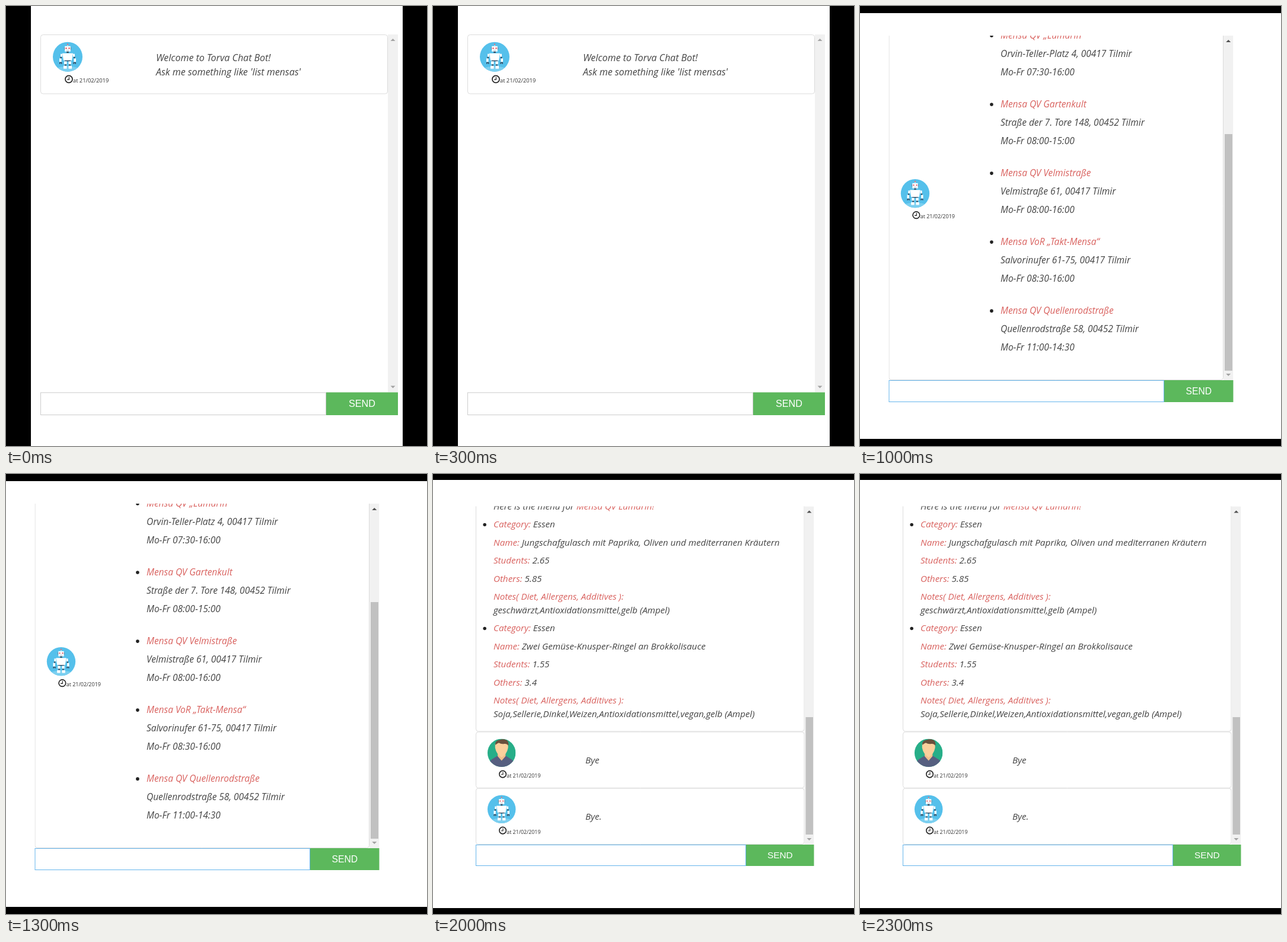
These frames come from a looping animation (710 by 742 pixels, 2.5 s). An HTML page with a canvas:

```html
<!DOCTYPE html>
<html lang="en">
<head>
<meta charset="utf-8">
<title>Chat bot demo</title>
<style>
html, body { margin: 0; width: 100%; height: 100%; overflow: hidden; background: #000; }
canvas { display: block; }
</style>
</head>
<body>
<canvas id="stage" width="710" height="742"></canvas>
<script>
const ctx = document.getElementById('stage').getContext('2d');
const STEP = 500;
const INK = '#454545', RED = '#d9625f', DIM = '#a3a3a3', DARK = '#505050';

const canteens = [
  ['Mensa QV „Lumarin“', 'Orvin-Teller-Platz 4, 00417 Tilmir', 'Mo-Fr 07:30-16:00'],
  ['Mensa QV Gartenkult', 'Straße der 7. Tore 148, 00452 Tilmir', 'Mo-Fr 08:00-15:00'],
  ['Mensa QV Velmistraße', 'Velmistraße 61, 00417 Tilmir', 'Mo-Fr 08:00-16:00'],
  ['Mensa VoR „Takt-Mensa“', 'Salvorinufer 61-75, 00417 Tilmir', 'Mo-Fr 08:30-16:00'],
  ['Mensa QV Quellenrodstraße', 'Quellenrodstraße 58, 00452 Tilmir', 'Mo-Fr 11:00-14:30'],
];

const dishes = [
  ['Jungschafgulasch mit Paprika, Oliven und mediterranen Kräutern', '2.65', '5.85',
    'geschwärzt,Antioxidationsmittel,gelb (Ampel)'],
  ['Zwei Gemüse-Knusper-Ringel an Brokkolisauce', '1.55', '3.4',
    'Soja,Sellerie,Dinkel,Weizen,Antioxidationsmittel,vegan,gelb (Ampel)'],
];

// s: zoom, page: white area, split: left edge of the button
const views = [
  { s: 1, page: [42, 0, 627, 742], left: 58, right: 644, end: 661, top: 48, bottom: 651.5,
    split: 540, foot: 690, border: '#ccc', up: DIM, down: DIM,
    draw() { welcome(48, 253); } },
  { s: 1.0075, page: [0, 9, 710, 725], left: 54.5, right: 643.5, end: 660.5, top: 29, bottom: 635,
    split: 539, foot: 673.5, thumb: [46, 461], up: DIM, down: DARK, caret: true,
    draw() {
      welcome(29, 251);
      message(130, 'user', 'list mensas', 251);
      card(231, 700);
      avatar('robot', 510);
      canteenList(251, 257);
    } },
  { s: 0.967, page: [0, 12, 710, 718], left: 48.5, right: 613, end: 629.5, top: 50, bottom: 631,
    split: 513, foot: 668, thumb: [216, 615], up: DARK, down: DIM,
    draw() {
      card(0, 631);
      avatar('robot', 292);
      canteenList(237, 49.5);
    } },
  { s: 0.95, page: [0, 11, 710, 720], left: 73.5, right: 628.5, end: 644.5, top: 57.5, bottom: 629,
    split: 529.5, foot: 665, thumb: [386, 613], up: DARK, down: DIM,
    draw() {
      message(57.5, 'user', 'show me menu for lumarin today', 258.5);
      card(152.5, 629);
      avatar('robot', 165);
      menu(103, 278.5);
    } },
  { s: 0.95, page: [0, 10, 710, 722], left: 72, right: 626.5, end: 642.5, top: 54.5, bottom: 625,
    split: 528, foot: 661, thumb: [410, 608], up: DARK, down: DIM,
    draw() {
      card(0, 434.5);
      menu(102, 85);
      message(434.5, 'user', 'Bye', 257);
      message(529.5, 'robot', 'Bye.', 257);
    } },
];
let view;

function rect(color, x, y, w, h) {
  ctx.fillStyle = color;
  ctx.fillRect(x, y, w, h);
}

function disc(color, x, y, r) {
  ctx.fillStyle = color;
  ctx.beginPath();
  ctx.arc(x, y, r, 0, 7);
  ctx.fill();
}

function shape(color, path) {
  ctx.fillStyle = color;
  ctx.fill(new Path2D(path));
}

// y is the middle of the capitals; returns the x where the text ends
function write(text, x, y, color = INK) {
  ctx.font = `italic ${16 * view.s}px "Open Sans", sans-serif`;
  ctx.fillStyle = color;
  ctx.fillText(text, x, y + 5.7 * view.s);
  return x + ctx.measureText(text).width;
}

function pair(label, value, x, y) {
  write(value, write(label + ' ', x, y, RED), y);
}

function card(top, bottom) {
  ctx.strokeStyle = '#dcdcdc';
  ctx.lineWidth = 1;
  ctx.beginPath();
  ctx.roundRect(view.left + 0.5, top + 0.5, view.right - view.left - 1, bottom - top - 1, 4);
  ctx.stroke();
}

function robot() {
  disc('#55c0eb', 25, 25, 25);
  shape('#7bcff0', 'M8 43.3a25 25 0 0 0 34 0q-17-5-34 0z');
  rect('#e6edf2', 24.4, 4, 1.2, 3);
  disc('#e8606a', 25, 4, 1.1);
  rect('#6f8494', 19, 9, 1.2, 4);
  rect('#6f8494', 29.8, 9, 1.2, 4);
  shape('#fff', 'M20.2 7h9.6v9h-9.6zM16 19h18l-2 12H18z');
  disc('#e04f5f', 22.5, 10.5, 1.2);
  disc('#e04f5f', 27.5, 10.5, 1.2);
  rect('#b3c0ca', 22.5, 13.4, 5, 1);
  rect('#34495e', 23.2, 16, 3.6, 2.4);
  shape('#fff', 'M13 20h3v5h-3zM34 20h3v5h-3zM11 27.5h3.5v6h-3.5zM35.5 27.5h3.5v6h-3.5z');
  shape('#34495e', 'M12.5 25h2.5v2.5h-2.5zM35 25h2.5v2.5h-2.5z'
    + 'M11 34h4.5v3h-1.5v-1.5h-1.5v1.5h-1.5zM39 34h-4.5v3h1.5v-1.5h1.5v1.5h1.5z'
    + 'M20 31h10v1.5H20zM20 37.5h3v2.5h-3zM27 37.5h3v2.5h-3z');
  shape('#fff', 'M19 32.5h4.5v5H19zM26.5 32.5H31v5h-4.5zM18 40h5.5v5H18zM26.5 40H32v5h-5.5z');
}

function user() {
  ctx.save();
  ctx.beginPath();
  ctx.arc(25, 25, 25, 0, 7);
  ctx.clip();
  rect('#27ae88', 0, 0, 50, 50);
  shape('#565f80', 'M2 50q0-12 8-15l8-5h14l8 5q8 3 8 15z');
  shape('#f2c08c', 'M18 25h14v6l-7 8-7-8z');
  shape('#fbd09c', 'M13.5 9q11.5-5 23 0v7q-2 11-11.5 17q-9.5-6-11.5-17z');
  shape('#6a503d', 'M14 11q-1-8 7-9q8-3 14 1q3 3 2 9q-3-4-7-3q-6 1-10-2q-3 1-6 4z');
  ctx.restore();
}

function avatar(kind, top) {
  ctx.save();
  ctx.translate(view.left + 21 * view.s, top);
  ctx.scale(view.s, view.s);
  (kind === 'user' ? user : robot)();
  ctx.strokeStyle = '#222';
  ctx.lineWidth = 1.7;
  ctx.beginPath();
  ctx.arc(27, 62.7, 6, 0, 7);
  ctx.stroke();
  ctx.lineWidth = 1.2;
  ctx.stroke(new Path2D('M27.4 59v4.4h-3.4'));
  ctx.font = '9.3px "Open Sans", sans-serif';
  ctx.fillStyle = '#333';
  ctx.fillText('at 21/02/2019', 34, 68.6);
  ctx.restore();
}

function message(top, kind, text, x) {
  card(top, top + 100.5 * view.s);
  avatar(kind, top + 12.7 * view.s);
  write(text, x, top + 51 * view.s);
}

function welcome(top, x) {
  message(top, 'robot', '', x);
  write('Welcome to Torva Chat Bot!', x, top + 39);
  write("Ask me something like 'list mensas'", x, top + 63);
}

function bullet(x, y) {
  disc('#222', x - 15.6 * view.s, y + 0.5, 2.9 * view.s);
}

function canteenList(x, y) {
  canteens.forEach((lines, i) => {
    const top = y + i * 120 * view.s;
    bullet(x, top);
    lines.forEach((line, j) => write(line, x, top + j * 32 * view.s, j ? INK : RED));
  });
}

function menu(x, y) {
  const intro = y - 32 * view.s;
  write('Mensa QV Lumarin!', write('Here is the menu for ', x, intro), intro, RED);
  dishes.forEach(([name, students, others, notes], i) => {
    const row = offset => y + (i * 184.2 + offset) * view.s;
    bullet(x, row(0));
    pair('Category:', 'Essen', x, row(0));
    pair('Name:', name, x, row(32));
    pair('Students:', students, x, row(64));
    pair('Others:', others, x, row(96));
    write('Notes( Diet, Allergens, Additives ):', x, row(128), RED);
    write(notes, x, row(152));
  });
}

function arrow(color, y, dir) {
  const x = (view.right + view.end) / 2;
  shape(color, `M${x - 4} ${y + 2 * dir}h8l-4 ${-4 * dir}z`);
}

function scrollbar() {
  const { right, end, top, bottom, thumb, up, down } = view;
  rect('#f1f1f1', right, top, end - right, bottom - top);
  if (thumb) rect('#c1c1c1', right + 2, thumb[0], end - right - 3.5, thumb[1] - thumb[0]);
  arrow(up, top + 9, 1);
  arrow(down, bottom - 9, -1);
}

function inputBar() {
  const { s, left, end, bottom, split, foot, border = '#66b5ec', caret } = view;
  ctx.strokeStyle = border;
  ctx.lineWidth = 1;
  ctx.strokeRect(left + 0.5, bottom + 0.5, split - left - 1, foot - bottom - 1);
  if (caret) rect('#222', 67.5, 646, 1, 17);
  rect('#5cb85c', split, bottom, end - split, foot - bottom);
  ctx.font = `${16.2 * s}px "Liberation Sans", Arial, sans-serif`;
  ctx.fillStyle = '#fff';
  ctx.textAlign = 'center';
  ctx.fillText('SEND', (split + end) / 2, (bottom + foot) / 2 + 5.2 * s);
  ctx.textAlign = 'left';
}

function render() {
  view = views[Math.floor(performance.now() / STEP) % views.length];
  rect('#000', 0, 0, 710, 742);
  rect('#fff', ...view.page);
  ctx.save();
  ctx.beginPath();
  ctx.rect(view.left, view.top, view.end - view.left, view.bottom - view.top);
  ctx.clip();
  view.draw();
  scrollbar();
  ctx.restore();
  inputBar();
  requestAnimationFrame(render);
}
render();
</script>
</body>
</html>
```
